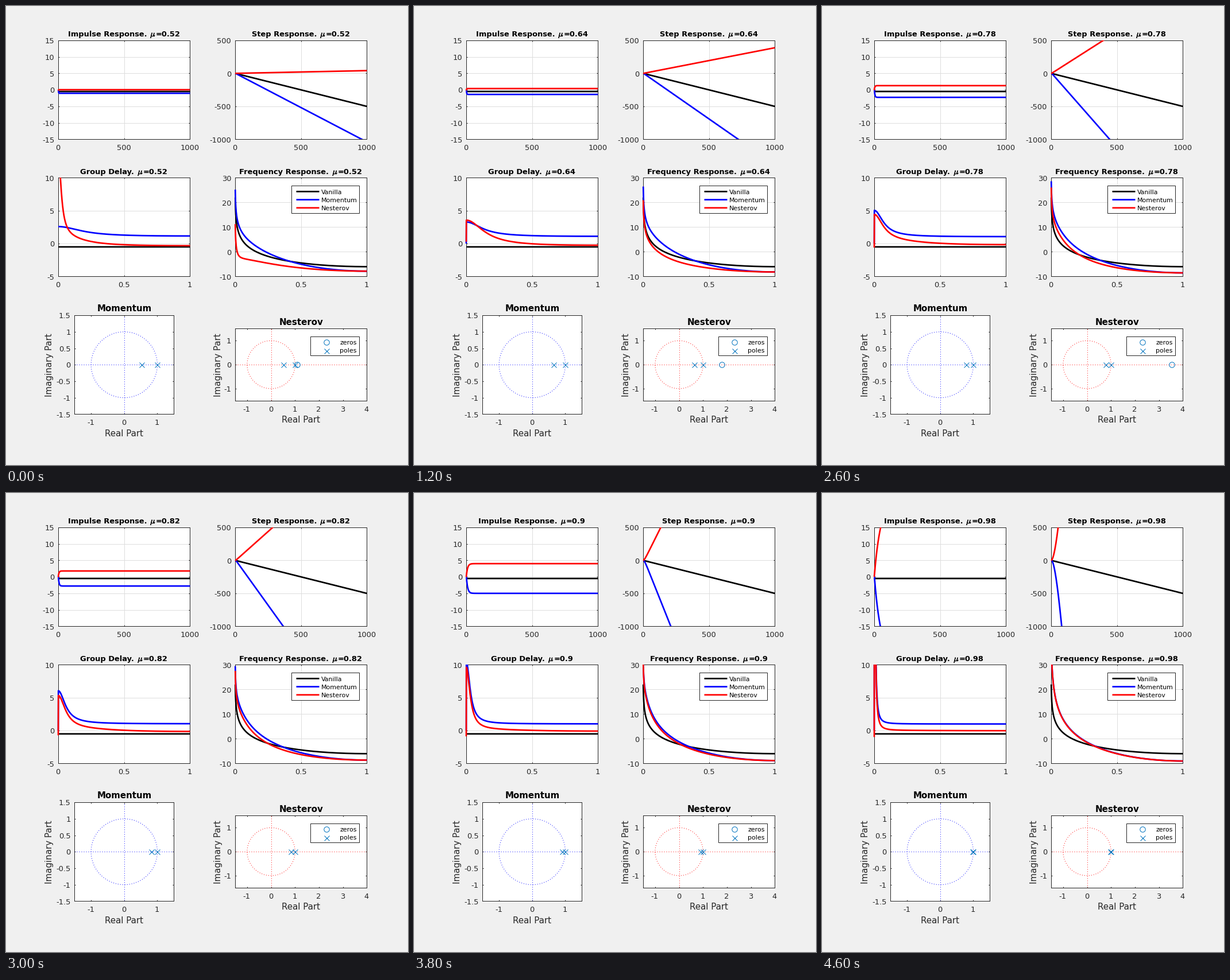
Recreate the animation shown at these times as a matplotlib script. Size 700 by 800 pixels, loop 4.8 s.

```python
import numpy as np
import matplotlib.pyplot as plt
from matplotlib import patheffects
from matplotlib.animation import FuncAnimation
from matplotlib.patches import Rectangle
from matplotlib.transforms import Bbox

W, H, DPI = 700, 800, 100
PX = 72 / DPI                      # points per pixel
FRAMES, INTERVAL = 24, 200
INK, GRID, MARK = "#262626", "#dedede", "#0072bd"
COLORS = ["black", "blue", "red"]
GAIN = -0.5

plt.rcParams.update({"font.family": "DejaVu Sans", "mathtext.fontset": "cm"})
fig = plt.figure(figsize=(W / DPI, H / DPI), dpi=DPI, facecolor="#f0f0f0")

# Overlay measured in pixels, for text and legends
top = fig.add_axes([0, 0, 1, 1], zorder=5)
top.set(xlim=(0, W), ylim=(H, 0))
top.axis("off")


def label(x, y, s, size=13, ha="center", **kw):
    kw = {"va": "baseline", "color": INK, **kw}
    return top.text(x, y, s, fontsize=size * PX, ha=ha, **kw)


def panel(x0, y0, x1, y1, xlim, ylim, xticks, yticks, grid=True):
    ax = fig.add_axes([x0 / W, 1 - y1 / H, (x1 - x0) / W, (y1 - y0) / H])
    ax.set(xlim=xlim, ylim=ylim, xticks=xticks, yticks=yticks)
    ax.set_axisbelow(True)
    ax.tick_params(direction="in", length=2.3 * PX, width=PX, color=INK,
                   top=True, right=True, labelbottom=False, labelleft=False)
    for side in ax.spines.values():
        side.set(linewidth=PX, color=INK)
    if grid:
        ax.grid(color=GRID, linewidth=PX)
    for v in xticks:
        px = x0 + (v - xlim[0]) / (xlim[1] - xlim[0]) * (x1 - x0)
        label(px - 0.5, y1 + 18.8, f"{v:g}")
    for v in yticks:
        py = y1 - (v - ylim[0]) / (ylim[1] - ylim[0]) * (y1 - y0)
        label(x0 - 6.8, py + 5.2, f"{v:g}", ha="right")
    return ax


def curves(ax):
    """Three thick lines, cut at the y limits but free to overlap the sides."""
    box = ax.get_window_extent()
    clip = Bbox.from_extents(box.x0 - 3, box.y0, box.x1 + 3, box.y1)
    lines = []
    for c in COLORS:
        line, = ax.plot([], [], color=c, lw=2.67 * PX, zorder=3, snap=False,
                        solid_capstyle="butt", solid_joinstyle="round")
        line.set_clip_box(clip)
        lines.append(line)
    return lines


class Title:
    """Bold heading followed by an italic mu and its value."""

    def __init__(self, cx, y, head):
        bold = dict(ha="left", color="black", weight="bold")
        self.cx = cx
        self.head = label(0, y, head, **bold)
        self.tail = label(0, y, "", **bold)
        self.mu = label(0, y, r"$\mu$", 14, ha="left", color="black")
        self.mu.set_path_effects(
            [patheffects.withStroke(linewidth=0.5 * PX, foreground="black")])

    def update(self, mu):
        self.tail.set_text(f"={mu:g}")
        wh, wt = (t.get_window_extent().width for t in (self.head, self.tail))
        x = self.cx - (wh + 15.5 + wt) / 2 - 0.5
        self.head.set_x(x)
        self.mu.set_x(x + wh + 6)
        self.tail.set_x(x + wh + 15.5)


XA, XB, XC, XD = 91, 320.45, 399, 628.45
R1, R2 = (59.8, 232.45), (299.4, 471.45)

impulse = panel(XA, R1[0], XB, R1[1], (0, 1000), (-15, 15),
                [0, 500, 1000], range(-15, 16, 5))
step = panel(XC, R1[0], XD, R1[1], (0, 1000), (-1000, 500),
             [0, 500, 1000], range(-1000, 501, 500))
delay = panel(XA, R2[0], XB, R2[1], (0, 1), (-5, 10),
              [0, 0.5, 1], range(-5, 11, 5))
freq = panel(XC, R2[0], XD, R2[1], (0, 1), (-10, 30),
             [0, 0.5, 1], range(-10, 31, 10))
impulse_l, step_l, delay_l, freq_l = map(curves, (impulse, step, delay, freq))

titles = [Title(206, 53, "Impulse Response."), Title(514, 53, "Step Response."),
          Title(206, 293, "Group Delay."), Title(514, 293, "Frequency Response.")]


def cross(ax, x, y):
    return ax.plot(x, y, "x", color=MARK, ms=9 * PX, mew=PX, clip_on=False,
                   zorder=4)[0]


def ring(ax, x, y):
    return ax.plot(x, y, "o", mfc="none", mec=MARK, ms=9.4 * PX, mew=PX,
                   clip_on=False, zorder=4)[0]


def plane(name, color, box, xlim, xticks, yticks):
    x0, y0, x1, y1 = box
    ax = panel(*box, xlim, (-1.5, 1.5), xticks, yticks, grid=False)
    t = np.linspace(0, 2 * np.pi, 400)
    dots = dict(color=color, lw=PX, ls=(0, (1, 3)))
    ax.plot(np.cos(t), np.sin(t), **dots)
    ax.axhline(0, **dots)
    ax.axvline(0, **dots)
    cx = (x0 + x1) / 2
    label(cx, y0 - 6.7, name, 15, color="black", weight="bold")
    label(cx, y1 + 38.3, "Real Part", 15)
    return ax


momentum = plane("Momentum", "blue", (119.3, 539.2, 292.3, 711.4), (-1.5, 1.5),
                 [-1, 0, 1], np.arange(-1.5, 1.6, 0.5))
nesterov = plane("Nesterov", "red", (XC, 562.4, XD, 687.8), (-1.5, 4),
                 range(-1, 5), [-1, 0, 1])
for x in (80.4, 374.4):
    label(x, 625.5, "Imaginary Part", 15, rotation=90, rotation_mode="anchor")
poles = [cross(ax, [], []) for ax in (momentum, nesterov)]
zero = ring(nesterov, [], [])


def legend_box(x0, y0, x1, y1):
    top.add_patch(Rectangle((x0, y0), x1 - x0, y1 - y0, fc="white", ec=INK,
                            lw=PX, zorder=2))


legend_box(497, 313, 615, 361)
for i, (name, c) in enumerate(zip(("Vanilla", "Momentum", "Nesterov"), COLORS)):
    y = 323.4 + 14.2 * i
    top.plot([505.5, 545.5], [y, y], color=c, lw=2.67 * PX, zorder=3,
             snap=False, solid_capstyle="butt")
    label(548.5, y + 4.2, name, 11, ha="left", color="black")

legend_box(530, 576, 615, 609)
ring(top, [557.5], [585.5])
cross(top, [557.5], [600.5])
label(581.5, 590, "zeros", 11, ha="left", color="black")
label(581.5, 604.4, "poles", 11, ha="left", color="black")

n = np.arange(1001)
w = np.linspace(0, np.pi, 1001)
zi = np.exp(-1j * w)               # z^-1 on the unit circle


def lag(c0, c1):
    """Group delay of c0 + c1 z^-1."""
    return (c1 * zi / (c0 + c1 * zi)).real


def responses(mu):
    """Impulse responses of the plain, momentum and Nesterov updates."""
    geo = (1 - mu ** (n + 1)) / (1 - mu)
    late = np.r_[0, geo[:-1]]
    late2 = np.r_[0, late[:-1]]
    return [np.full(n.size, GAIN), GAIN * late2,
            GAIN * ((1 - mu) * geo - mu * late)]


def delays(mu):
    pole = lag(1, -mu)
    mom = 1.5 - pole
    nes = -0.5 + lag(1 - mu, -mu) - pole
    if mu >= 0.6:                  # the pole on z = 1 is dropped at w = 0
        mom[0] = 0
        nes[0] = mu / (2 * mu - 1) - 2
    return [np.full(w.size, -0.5), mom, nes]


def gains(mu):
    z = zi[1:]
    plain = GAIN / (1 - z)
    mom = plain / (1 - mu * z)
    return [10 * np.log10(abs(h)) for h in (plain, mom, mom * (1 - mu - mu * z))]


def update(k):
    mu = round(0.52 + 0.02 * k, 2)
    for t in titles:
        t.update(mu)
    for i, h in enumerate(responses(mu)):
        impulse_l[i].set_data(n, h)
        step_l[i].set_data(n, np.cumsum(h))
    for line, g in zip(delay_l, delays(mu)):
        line.set_data(w / np.pi, g)
    for line, g in zip(freq_l, gains(mu)):
        line.set_data(w[1:] / np.pi, g)
    for p in poles:
        p.set_data([mu, 1], [0, 0])
    x = mu / (1 - mu)
    zero.set_data([x], [0])
    zero.set_visible(x < 4.01)
    return []


anim = FuncAnimation(fig, update, frames=FRAMES, interval=INTERVAL,
                     init_func=lambda: [], repeat=True, repeat_delay=0)
plt.show()
```
